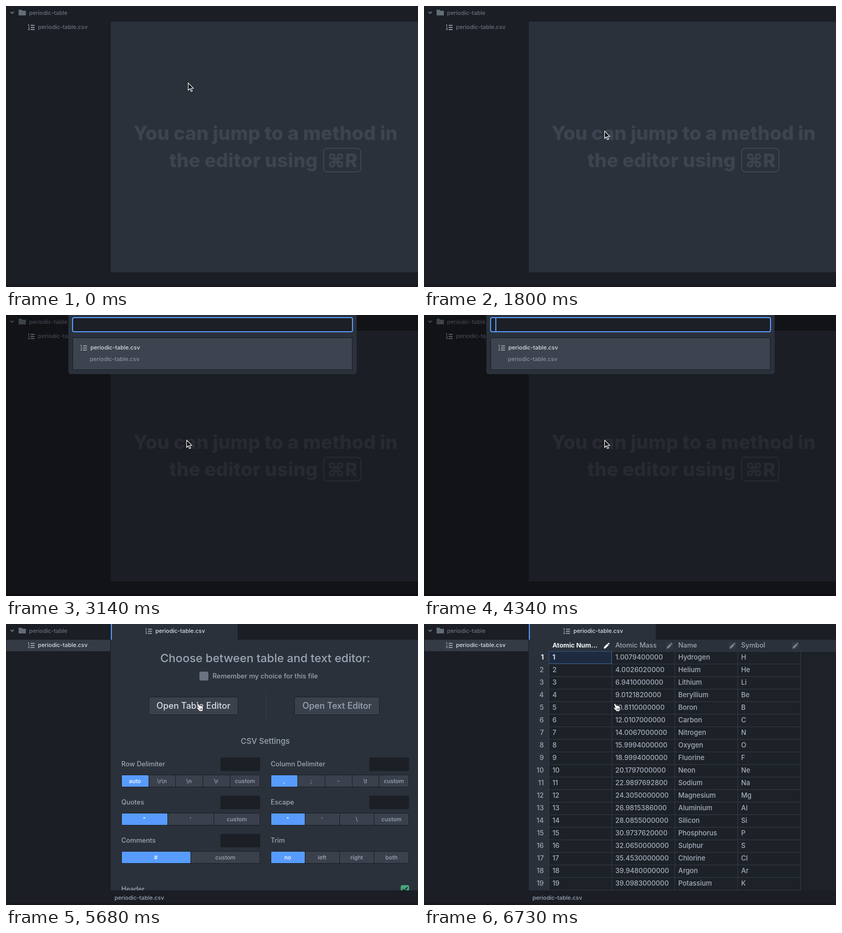
Recreate the animation shown at these times as an HTML page. Size 786 by 537 pixels, loop 8 s.

```html
<!DOCTYPE html>
<html lang="en">
<head>
<meta charset="utf-8">
<title>Table editor</title>
<style>
html, body { margin: 0; width: 100%; height: 100%; overflow: hidden; background: #1b1e25; }
svg { display: block; width: 786px; height: 537px; font: 500 11px Inter, "Liberation Sans", sans-serif; }
text { font-optical-sizing: none; white-space: pre; }
</style>
</head>
<body>
<svg id="stage" viewBox="0 0 786 537"></svg>
<script>
const SIDE = '#1b1e25', PANE = '#2b313b', DIM = '#69717d', TEXT = '#9da6b4', LIGHT = '#d9dde4',
  BLUE = '#579bfc', EDGE = '#1a1d23', BUTTON = '#3a414c', TIP = '#3e444f', GRID = '#343b45';
const FILE = 'periodic-table.csv';

const rect = (x, y, x2, y2, fill, more = '') =>
  `<rect x="${x}" y="${y}" width="${x2 - x}" height="${y2 - y}" fill="${fill}" ${more}/>`;
const text = (x, y, s, fill = TEXT, size = 10.85, more = '') =>
  `<text x="${x}" y="${y}" fill="${fill}" font-size="${size}" ${more}>${s}</text>`;
const path = (d, more) => `<path d="${d}" ${more}/>`;
const group = (id, ...parts) => `<g id="${id}">${parts.join('')}</g>`;
const MID = ' text-anchor="middle"', END = ' text-anchor="end"';
const BOLD = ' font-weight="700"', HEAVY = ' font-weight="800"';

const listIcon = (x, y) => `<g transform="translate(${x} ${y})">` +
  text(-.3, 4.8, '1', '#aeb8be', 6, BOLD) + text(-.3, 11, '2', '#aeb8be', 6, BOLD) +
  path('M5 2H12.5M5 6H12.5M5 10H12.5', 'stroke="#aeb8be" stroke-width="1.6"') + '</g>';

const sidebar = rect(0, 0, 786, 537, SIDE) + rect(0, 533, 786, 537, '#18181e') +
  rect(200, 30, 786, 509, PANE) +
  group('selectedRow', rect(1, 30, 199, 52, '#343b45')) +
  path('M8.5 11L11.7 14.2L14.9 11', `fill="none" stroke="${DIM}" stroke-width="2"`) +
  path('M24 8q0-1 1-1h4.5q1 0 1 1v1H37q1 0 1 1V17q0 1-1 1H25q-1 0-1-1z', 'fill="#616c76"') +
  text(44, 17, 'periodic-table', DIM) + listIcon(42, 35) +
  text(61, 44, FILE, DIM, 10.85, 'id="fileName"');

const tip = group('tip',
  text(495, 256, 'You can jump to a method in', TIP, 36.5, HEAVY + MID),
  text(311.5, 308, 'the editor using', TIP, 36.5, HEAVY),
  rect(606, 272, 677, 317, 'none', `rx="7" stroke="${TIP}" stroke-width="2"`),
  text(641.5, 308, '⌘R', TIP, 36, HEAVY + MID));

const hourglass = path('M127.5 44H135.5M127.5 54H135.5M128.5 44V46.5L131 49L128.5 51.5V54M134.5 44V46.5L132 49L134.5 51.5V54M129.5 52.5H133.5M130 46.5H133',
  `fill="none" stroke="${TEXT}" stroke-width="1.2"`);
const finder = group('finder',
  rect(0, 0, 786, 537, '#000', 'opacity=".38"'),
  `<rect id="dialog" x="119" y="-10" width="550" height="147" rx="5" fill="${PANE}"/>`,
  rect(127, 5, 661, 32, '#1c1f26', `rx="3" stroke="${BLUE}" stroke-width="2"`),
  group('caret', rect(136, 6, 138, 31, BLUE)),
  group('indexing', hourglass, text(145, 53, 'Reindexing project…')),
  group('result',
    rect(127.5, 67.5, 660.5, 128.5, '#3d434f', `stroke="${EDGE}"`),
    listIcon(142, 81), text(161, 90, FILE, LIGHT), text(160, 112, FILE, '#8a909c')));

const tab = rect(200, 0, 442, 30, PANE) +
  `<rect id="tabBar" x="200" y="0" width="2" height="30" fill="${BLUE}"/>` +
  listIcon(266, 8) + text(285, 16.5, FILE, LIGHT);

const button = (x, x2, label, id) =>
  rect(x + .5, 139.5, x2 - .5, 173.5, BUTTON, `rx="2" stroke="${EDGE}"`) +
  text((x + x2) / 2, 162, label, TEXT, 16.6, MID + ` id="${id}"`);

// A labelled setting: the first option is the chosen one.
function setting(row, name, edges, options, field = true) {
  const y = 288 + row * 73, x = edges[0], end = edges[edges.length - 1];
  let out = text(x, y - 16, name, TEXT, 12.7);
  if (field) out += rect(end - 76, y - 33, end, y - 7, '#1c2026', 'rx="2"');
  out += rect(x, y, end, y + 24, EDGE, 'rx="3"');
  options.forEach((label, i) => {
    out += rect(edges[i] + 1, y + 1, edges[i + 1] - (i == options.length - 1), y + 23, i ? BUTTON : BLUE, 'rx="1"') +
      text((edges[i] + edges[i + 1]) / 2, y + 15.5, label, i ? TEXT : '#fff', 10.85, MID);
  });
  return out;
}
const quarters = [505, 570, 636, 702, 769];
const chooser = group('chooser',
  text(494.5, 73, 'Choose between table and text editor:', TEXT, 22, MID),
  rect(369, 91, 386, 108, '#6b7380', 'rx="3"'),
  text(394, 104, 'Remember my choice for this file', TEXT, 12.8),
  rect(495, 130, 496, 185, '#373e48'),
  button(272, 443, 'Open Table Editor', 'openTable'),
  group('focusRing',
    rect(271, 138, 444, 175, '#303640', 'rx="3" stroke="#2c5f9c" stroke-width="4" stroke-opacity=".55"'),
    rect(271.5, 138.5, 443.5, 174.5, 'none', 'rx="2" stroke="#3a78c0" stroke-width="2"'),
    text(357.5, 162, 'Open Table Editor', LIGHT, 16.6, MID)),
  button(550, 713, 'Open Text Editor', 'openText'),
  text(494.5, 229, 'CSV Settings', TEXT, 14.9, MID),
  setting(0, 'Row Delimiter', [220, 272, 323, 375, 427, 485], ['auto', '\\r\\n', '\\n', '\\r', 'custom']),
  setting(0, 'Column Delimiter', [505, 556, 608, 660, 711, 769], [',', ';', '-', '\\t', 'custom']),
  setting(1, 'Quotes', [220, 308, 396, 485], ['"', "'", 'custom']),
  setting(1, 'Escape', quarters, ['"', "'", '\\', 'custom']),
  setting(2, 'Comments', [220, 352, 485], ['#', 'custom']),
  setting(2, 'Trim', quarters, ['no', 'left', 'right', 'both'], false),
  text(220, 511, 'Header', TEXT, 12.7),
  rect(753, 499, 769, 515, '#49a67a', 'rx="3"'),
  path('M757 506.5L760 510L766 503', `fill="none" stroke="${EDGE}" stroke-width="2"`));

const names = 'Hydrogen Helium Lithium Beryllium Boron Carbon Nitrogen Oxygen Fluorine Neon Sodium Magnesium Aluminium Silicon Phosphorus Sulphur Chlorine Argon Potassium'.split(' ');
const symbols = 'H He Li Be B C N O F Ne Na Mg Al Si P S Cl Ar K'.split(' ');
const masses = [1.00794, 4.002602, 6.941, 9.012182, 10.811, 12.0107, 14.0067, 15.9994, 18.9994, 20.1797,
  22.98976928, 24.305, 26.9815386, 28.0855, 30.973762, 32.065, 35.453, 39.948, 39.0983];
const pencil = (x, fill) => path(`M${x} 47l.6-3.2 6-6 2.6 2.6-6 6zM${x + 7.4} 37l1-1q.6-.4 1.1 0l1.3 1.3q.5.5 0 1.1l-1 1z`, `fill="${fill}"`);

function sheet() {
  let out = rect(200, 30, 786, 509, PANE) + rect(238, 53, 786, 509, '#1d2128');
  ['Atomic Num…', 'Atomic Mass', 'Name', 'Symbol'].forEach((title, i) => {
    const x = 245 + i * 120;
    if (i) out += rect(x + 96, 34, x + 110, 49, '#323842', 'rx="2"');
    out += text(x, 45, title, i ? TEXT : '#f2f4f7', i ? 12.8 : 12.3, i ? '' : BOLD) +
      pencil(x + 98, i ? '#7c838f' : '#fff');
  });
  let lines = 'M238 52.5H786';
  for (let i = 0; i < 19; i++) lines += `M238 ${76.5 + i * 24}H719`;
  for (let i = 0; i < 5; i++) lines += `M${238.5 + i * 120} 53V509`;
  out += path(lines, `stroke="${GRID}"`) +
    rect(238.5, 52.5, 357.5, 75.5, '#1d2a3f', 'stroke="#375380"');
  names.forEach((name, i) => {
    const y = 68 + i * 24;
    out += text(228.5, y, i + 1, i ? TEXT : '#f2f4f7', 12.9, END + (i ? '' : BOLD));
    [i + 1, masses[i].toFixed(10), name, symbols[i]].forEach((value, col) => {
      const active = !i && !col;
      out += text(245 + col * 120, y, value, active ? LIGHT : '#a6afbc', 12.9, active ? BOLD : '');
    });
  });
  return out;
}

const status = rect(200, 509, 786, 533, SIDE) + rect(200, 533, 786, 537, '#18181e') + text(207, 527, FILE);

const arrow = group('arrow', path('M.6 1V15L3.9 12L6.2 17.3L8.4 16.4L6.2 11.2H10.5Z',
  'fill="#0c0d10" stroke="#fff" stroke-width="1.1"'));
const hand = group('hand',
  path('M1.8 1.6C2.8.6 4 1 4.5 2L6 5.2C7 4.4 8.2 4.7 8.7 5.5C9.7 5 10.7 5.3 11.1 6.2C12.2 6 12.8 6.7 13 8V11.5L12 16H6C5 13.5 1.8 11.5.9 10C.3 8.8 1.6 8 2.8 8.8L4 9.6L1.6 3.4Z',
    'fill="#fff" stroke="#0c0d10" stroke-width=".9"'),
  path('M6.8 10.5L7.3 13.5M8.7 10.2L9 13.3M10.5 10V13', 'stroke="#0c0d10" stroke-width=".8"'));

const stage = document.getElementById('stage');
stage.innerHTML = sidebar + tip + finder +
  group('editor', tab, chooser, group('sheet', sheet()), status) + arrow + hand;

const el = id => document.getElementById(id);
const show = (id, on) => el(id).style.display = on ? '' : 'none';

// time, x, y, pointer
const moves = [[0, 347, 146, 'arrow'], [1050, 355, 160, 'arrow'], [1650, 344, 238.5, 'arrow'],
  [1800, 344, 238, 'arrow'], [5380, 362, 149, 'hand'], [5530, 363, 129, 'arrow'],
  [5680, 363, 151, 'hand'], [5830, 361, 151, 'hand']];
const carets = [2690, 3140, 3440, 3890, 4340];

function draw(now) {
  const t = now % 8000, open = t >= 4780;
  show('tip', !open);
  show('finder', t >= 2690 && !open);
  show('editor', open);
  show('selectedRow', open);
  el('fileName').setAttribute('fill', open ? LIGHT : DIM);

  const indexing = t < 2990;
  show('indexing', indexing);
  show('caret', carets.filter(c => c <= t).length % 2);
  el('dialog').setAttribute('height', indexing ? 147 : 123);
  el('result').setAttribute('transform', `translate(0 ${indexing ? 0 : -24})`);

  el('tabBar').setAttribute('height', t < 4930 ? 27 : t < 5080 ? 29 : 30);
  const move = moves.filter(m => m[0] <= t).pop();
  el('openTable').setAttribute('fill', move[3] == 'hand' ? LIGHT : TEXT);
  show('focusRing', t >= 6580);
  show('sheet', t >= 6730);

  for (const id of ['arrow', 'hand']) show(id, move[3] == id);
  el(move[3]).setAttribute('transform', `translate(${move[1]} ${move[2]})`);
}

const start = performance.now();
function tick() {
  draw(performance.now() - start);
  requestAnimationFrame(tick);
}
tick();
</script>
</body>
</html>
```
